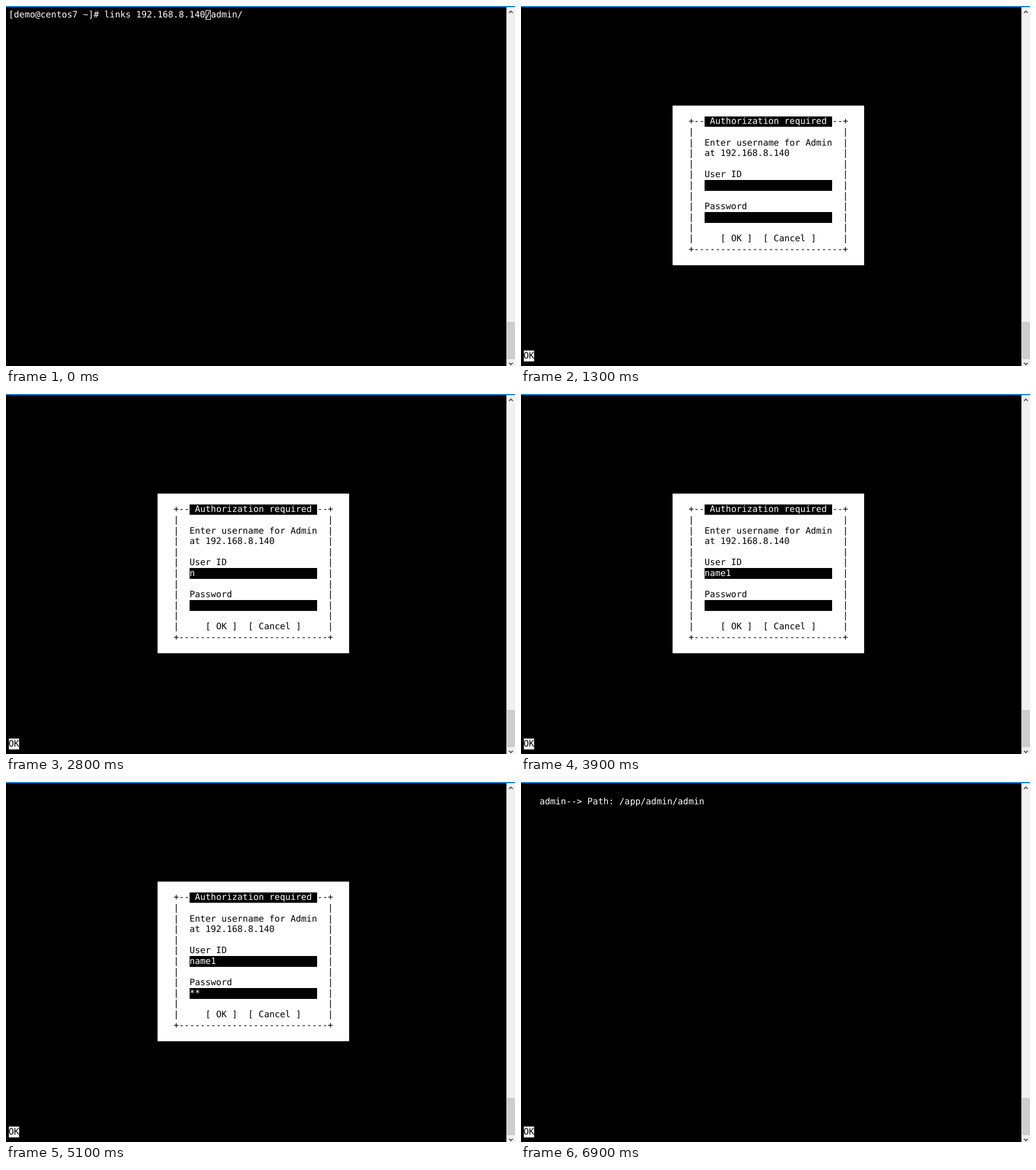
Recreate the animation shown at these times as an HTML page. Size 890x629 px, loop 8 s.

```html
<!DOCTYPE html>
<html lang="en">
<head>
<meta charset="utf-8">
<title>Terminal login</title>
<style>
  html, body { margin: 0; width: 100%; height: 100%; overflow: hidden; background: #000; }
  svg { display: block; }
  text {
    font-family: "DejaVu Sans Mono", monospace;
    font-size: 15.457px;
    white-space: pre;
    text-rendering: geometricPrecision;
  }
  rect { shape-rendering: crispEdges; }
</style>
</head>
<body>
<svg id="stage" width="890" height="629" viewBox="0 0 890 629">
  <rect width="890" height="629" fill="#000"/>
  <g id="prompt"></g>
  <g id="dialog"></g>
  <g id="page"></g>
  <g id="status"></g>
  <rect x="875" y="2" width="15" height="627" fill="#f0f0f0"/>
  <rect x="876" y="552" width="14" height="65" fill="#cdcdcd"/>
  <path d="M879.5 12.2L882.8 8.8L886.1 12.2M879.5 623.3L882.8 626.7L886.1 623.3"
        fill="none" stroke="#505050" stroke-width="1.8"/>
  <rect width="890" height="2" fill="#0a84d8"/>
</svg>
<script>
const LOOP = 8000;
const LEFT = 4.5, TOP = 6.5, CELL_W = 9.306, CELL_H = 18.61, BASELINE = 13.7;
const USER = "name1";
const USER_KEYS = [2800, 3000, 3100, 3200, 3900];
const PASSWORD_KEYS = [5100, 5100, 5300, 5400, 5600, 5800];

const [prompt, dialog, page, status] =
  ["prompt", "dialog", "page", "status"].map(id => document.getElementById(id));

function add(parent, tag, attrs) {
  const node = document.createElementNS("http://www.w3.org/2000/svg", tag);
  for (const key in attrs) node.setAttribute(key, attrs[key]);
  return parent.appendChild(node);
}

const colX = col => LEFT + col * CELL_W;
const rowY = row => TOP + row * CELL_H;

function write(parent, col, row, string, fill) {
  const node = add(parent, "text", { x: colX(col), y: rowY(row) + BASELINE, fill });
  node.textContent = string;
  return node;
}

function block(parent, col, row, cols, rows, fill) {
  const x = Math.round(colX(col)), y = Math.round(rowY(row));
  add(parent, "rect", {
    x, y, fill,
    width: Math.round(colX(col + cols)) - x,
    height: Math.round(rowY(row + rows)) - y
  });
}

write(prompt, 0, 0, "[demo@centos7 ~]# links 192.168.8.140", "#fff");
const slash = write(prompt, 37, 0, "/", "#fff");
write(prompt, 38, 0, "admin/", "#fff");
add(prompt, "rect", { x: 349.5, y: 7.5, width: 8, height: 16, fill: "none", stroke: "#fff" });

block(dialog, 28, 9, 36, 15, "#fff");
write(dialog, 31, 10, "+--", "#000");
write(dialog, 58, 10, "--+", "#000");
for (let row = 11; row <= 21; row++) {
  write(dialog, 31, row, "|", "#000");
  write(dialog, 60, row, "|", "#000");
}
write(dialog, 31, 22, "+" + "-".repeat(28) + "+", "#000");
for (const row of [10, 16, 19]) block(dialog, 34, row, 24, 1, "#000");
write(dialog, 35, 10, "Authorization required", "#fff");
write(dialog, 34, 12, "Enter username for Admin", "#000");
write(dialog, 34, 13, "at 192.168.8.140", "#000");
write(dialog, 34, 15, "User ID", "#000");
write(dialog, 34, 18, "Password", "#000");
write(dialog, 37, 21, "[ OK ]", "#000");
write(dialog, 45, 21, "[ Cancel ]", "#000");
const userField = write(dialog, 34, 16, "", "#fff");
const passwordField = write(dialog, 34, 19, "", "#fff");

write(page, 3, 1, "admin--> Path: /app/admin/admin", "#fff");

block(status, 0, 32, 2, 1, "#fff");
write(status, 0, 32, "OK", "#000");

const show = (node, visible) => node.setAttribute("display", visible ? "inline" : "none");
const typed = (keys, t) => keys.filter(time => time <= t).length;

function render(t) {
  show(prompt, t < 1300);
  show(dialog, t >= 1300 && t < 6900);
  show(page, t >= 6900);
  show(status, t >= 1300);
  slash.setAttribute("fill", t < 200 ? "#fff" : "#007000");
  userField.textContent = USER.slice(0, typed(USER_KEYS, t));
  passwordField.textContent = "*".repeat(typed(PASSWORD_KEYS, t));
}

const start = performance.now();
function tick() {
  render((performance.now() - start) % LOOP);
  requestAnimationFrame(tick);
}
tick();
</script>
</body>
</html>
```
